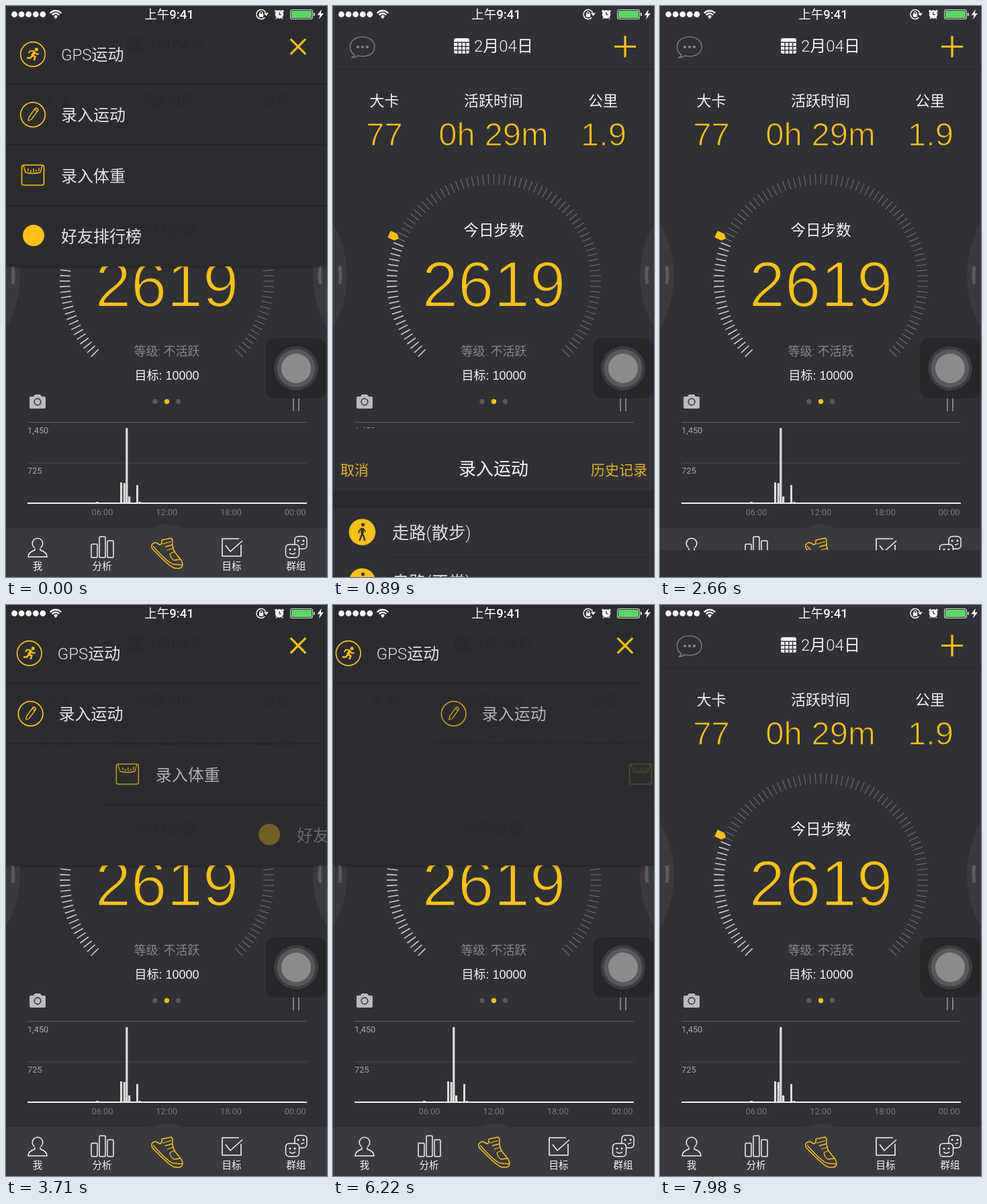
Write an HTML page with a canvas that moves like this. It is 478 px wide and 851 px high and loops after 8000 ms.

```html
<!DOCTYPE html>
<html lang="zh-CN">
<head>
<meta charset="utf-8">
<style>
html, body { margin: 0; width: 100%; height: 100%; overflow: hidden; background: #303136; }
canvas { display: block; width: 478px; height: 851px; }
</style>
</head>
<body>
<canvas id="stage"></canvas>
<script>
const W = 478, H = 851, LOOP = 8000;
const YELLOW = '#fec10d', BG = '#303136', DARK = '#2b2c2f', BAR = '#393a3f', WHITE = '#f4f4f4';
const CJK = '"Noto Sans CJK SC", "Noto Sans CJK", sans-serif';
const FONT = 'Roboto, ' + CJK, GROTESK = '"Liberation Sans", ' + CJK;
const canvas = document.getElementById('stage');
const ctx = canvas.getContext('2d');
const dpr = window.devicePixelRatio || 1;
canvas.width = W * dpr;
canvas.height = H * dpr;

const clamp = v => Math.min(1, Math.max(0, v));
const ramp = (t, start, length) => clamp((t - start) / length);
const smooth = v => v * v * (3 - 2 * v);

// y is the visual middle of the text line
function text(s, x, y, size, color = WHITE, align = 'center', weight = 300, family = FONT) {
  ctx.font = `${weight} ${size}px ${family}`;
  ctx.textAlign = align;
  ctx.fillStyle = color;
  ctx.fillText(s, x, y + size * 0.36);
}
// Large light numerals: a regular face thinned by an outline in the ground colour
function figure(s, x, y, size, color, ground) {
  text(s, x, y, size, color, 'center', 400, GROTESK);
  ctx.strokeStyle = ground;
  ctx.lineWidth = size * 0.023;
  ctx.strokeText(s, x, y + size * 0.36);
}
function rect(x, y, w, h, color) {
  ctx.fillStyle = color;
  ctx.fillRect(x, y, w, h);
}
function box(x, y, w, h, r, color, stroke) {
  ctx.beginPath();
  ctx.roundRect(x, y, w, h, r);
  paint(color, stroke);
}
function disc(x, y, r, color, stroke) {
  ctx.beginPath();
  ctx.arc(x, y, r, 0, Math.PI * 2);
  paint(color, stroke);
}
function paint(color, stroke) {
  if (stroke) {
    ctx.strokeStyle = color;
    ctx.lineWidth = stroke;
    ctx.stroke();
  } else {
    ctx.fillStyle = color;
    ctx.fill();
  }
}
function line(d, color, width) {
  ctx.strokeStyle = color;
  ctx.lineWidth = width;
  ctx.stroke(new Path2D(d));
}
function shape(d, color) {
  ctx.fillStyle = color;
  ctx.fill(new Path2D(d));
}
function at(x, y, draw, angle = 0, scale = 1) {
  ctx.save();
  ctx.translate(x, y);
  ctx.rotate(angle);
  ctx.scale(scale, scale);
  draw();
  ctx.restore();
}

const athletes = {
  walk(c) {
    disc(1, -11, 2.6, c);
    line('M0-6L0 2', c, 4.3);
    line('M0 2L-4 13M0 2L2 6L4 13', c, 2.4);
    line('M-1-6L-5-1L-5 2M1-6L5 0', c, 1.7);
  },
  jog(c) {
    disc(4, -10, 2.8, c);
    line('M2-5L0 2', c, 4.5);
    line('M0 2L4 5L3 11M0 2L-3 7L-8 9', c, 2.7);
    line('M2-6L-4-4L-6 0M2-5L5-1L8-2', c, 2.1);
  },
  run(c) {
    disc(6, -8, 2.8, c);
    line('M3-4L-1 2', c, 4.5);
    line('M-1 2L4 4L2 10M-1 2L-4 6L-10 6', c, 2.8);
    line('M3-5L-4-6L-7-2M3-4L6 0L10-1', c, 2.1);
  },
  bike(c) {
    disc(-7, 5, 4.2, c, 1.2);
    disc(7, 5, 4.2, c, 1.2);
    disc(5, -9, 2.3, c);
    line('M3-6L-3-2L1 1L0 6', c, 2.6);
    line('M3-5L5-2L8-2', c, 1.7);
    line('M-7 5L-3 0M0 6L6 1L7 5', c, 1.1);
  },
  swim(c) {
    disc(8, -2, 2.7, c);
    shape('M-10 2L-2-1L-5-4L2-8L8-6L2-5L5 2L-2 3Z', c);
    line('M-14 4Q-10 1-6 4T2 4T10 4L14 3', c, 1.8);
  }
};

function statusBar() {
  for (let i = 0; i < 5; i++) disc(12.5 + i * 10.6, 12.5, 4.4, '#fff');
  for (const r of [4, 8, 12]) {
    ctx.beginPath();
    ctx.arc(74, 18, r - 1, -Math.PI * 0.77, -Math.PI * 0.23);
    paint('#fff', 2.3);
  }
  disc(74, 17, 1.8, '#fff');
  text('上午9:41', 243, 12.5, 18.5, '#fff', 'center', 500);
  ctx.beginPath();
  ctx.arc(380, 12.5, 7, 0.7, 5.9);
  paint('#fff', 1.4);
  shape('M384 10.5L391 10.5L387.5 15Z', '#fff');
  box(376.8, 11.5, 6.4, 5, 0.8, '#fff');
  line('M378 12V10.5A2 2 0 0 1 382 10.5V12', '#fff', 1.2);
  disc(407, 12.5, 6.2, '#fff');
  line('M400.5 8.5L403 6.2M413.5 8.5L411 6.2M403 18L402 19M411 18L412 19', '#fff', 2);
  line('M407 9V12.8H410', BG, 1.3);
  box(423.5, 5.5, 33, 14, 3, '#d8d8d8', 1.1);
  box(425, 7, 30, 11, 1.5, '#58d963');
  box(457.8, 10, 2, 5, 1, '#d8d8d8');
  shape('M470 5L463.5 13.5H467.5L466 20L473 11H468.7Z', '#fff');
}

function calendar(color, hole) {
  box(180, 48, 23, 23, 3, color);
  rect(180, 53.5, 23, 1.5, hole);
  for (let i = 1; i < 4; i++) rect(179.5 + i * 5.8, 54, 1.4, 17, hole);
  for (let i = 1; i < 3; i++) rect(180, 54 + i * 5.6, 23, 1.4, hole);
}

function headings(label, value, ground) {
  calendar(label, ground);
  text('2月04日', 210, 59.5, 24, label, 'left');
  text('大卡', 76.5, 141, 22, label);
  text('活跃时间', 239, 141, 22, label);
  text('公里', 402, 141, 22, label);
  figure('77', 76.5, 190, 49, value, ground);
  figure('0h 29m', 239, 190, 49, value, ground);
  figure('1.9', 403, 190, 49, value, ground);
  text('今日步数', 239.5, 334, 22.5, label);
}

function gauge() {
  const cx = 239.5, cy = 410;
  for (let i = 0; i <= 90; i++) {
    const a = (135 + i * 3) * Math.PI / 180, c = Math.cos(a), s = Math.sin(a);
    const on = i < 23;
    ctx.beginPath();
    ctx.moveTo(cx + c * 144, cy + s * 144);
    ctx.lineTo(cx + c * 159.5, cy + s * 159.5);
    paint(on ? '#d2d2d2' : '#67686b', on ? 1.6 : 1.3);
  }
  at(cx, cy, () => shape('M-171-4.5Q-171-5.5-170-5.5H-160L-155 0L-160 5.5H-170Q-171 5.5-171 4.5Z', YELLOW),
    24.2 * Math.PI / 180);
}

function sideHandles() {
  disc(-134, 402, 155, '#3a3b3f');
  disc(612, 402, 155, '#3a3b3f');
  line('M10 388Q12 401 10 414', '#5b5c60', 5);
  line('M468 388Q466 401 468 414', '#5b5c60', 5);
}

function chart() {
  rect(32, 620, 416, 1, '#5b5c5f');
  rect(32, 680.5, 416, 1, '#4c4d50');
  const bars = [[134, 2, 4], [170, 31, 3], [174.7, 30, 3], [178.2, 112, 3.2], [182, 10, 3.2], [194, 27, 3], [198, 2, 3]];
  for (const [x, h, w] of bars) rect(x, 741 - h, w, h, '#dedede');
  rect(32, 740, 416, 2, '#ececec');
  text('1,450', 32, 632, 12.8, '#a5a5a7', 'left', 400);
  text('725', 32, 692, 12.8, '#a5a5a7', 'left', 400);
  ['06:00', '12:00', '18:00', '00:00'].forEach((s, i) => text(s, 143.5 + i * 95.7, 754, 12.8, '#7a7b7e', 'center', 400));
}

function tabBar() {
  disc(240, 817, 45, BAR);
  rect(0, 778, W, 73, BAR);
  disc(240, 817, 44.5, 'rgba(0,0,0,.06)', 1);
  disc(47, 801, 7.8, WHITE, 1.5);
  rect(42, 807, 10, 4, BAR);
  line('M43 808V811Q33 814 33 821H61Q61 814 51 811V808', WHITE, 1.5);
  box(127, 802, 9, 20, 1.5, WHITE, 1.5);
  box(139, 791, 9, 31, 1.5, WHITE, 1.5);
  box(151, 797, 9, 25, 1.5, WHITE, 1.5);
  line('M350 803V820H322V794H347M327 804L334 813L352 797', WHITE, 1.6);
  box(430, 790.5, 18, 18.5, 5, WHITE, 1.5);
  box(416.5, 802.5, 20, 19.5, 5, BAR);
  box(416.5, 802.5, 20, 19.5, 5, WHITE, 1.5);
  for (const [x, y] of [[435, 797], [443, 797], [423, 810], [430, 810]]) disc(x, y, 1.5, WHITE);
  line('M422 815Q426.5 819 431 815M439 803Q443 803 444 801', WHITE, 1.3);
  line('M217 803Q220 799 224 800L229 803Q233 802 232 796L246 793L248 796Q247 808 252 815L261 826Q264 832 262 836Q258 840 249 837Q241 833 218 809Q216 806 217 803Z', YELLOW, 1.5);
  line('M219 805Q240 829 249 832L262 833M233 802L246 798M237 806L248 803M240 811L250 808M244 816L252 813M244 816Q245 823 250 826L259 825', YELLOW, 1.3);
  [['我', 47], ['分析', 143], ['目标', 336], ['群组', 432]].forEach(([s, x]) => text(s, x, 835, 14.5, WHITE, 'center', 400));
}

function home() {
  rect(0, 0, W, H, BG);
  rect(0, 94, W, 1, '#26272a');
  line('M32 73Q25 68 25.5 60C26 51 34 46 44 46S62 52 62 61S54 75 44 75Q40 75 37 74Q33 77 28 77Q31 75 32 73Z', '#77787b', 1.6);
  for (const x of [37, 44, 51]) disc(x, 61, 2.1, '#8b8c8f');
  headings(WHITE, YELLOW, BG);
  sideHandles();
  gauge();
  figure('2619', 239.5, 413, 96, YELLOW, BG);
  text('等级: 不活跃', 239.5, 515, 18, '#85868a');
  text('目标: 10000', 239.5, 551, 18, WHITE, 'center', 400, GROTESK);
  for (const x of [222, 239.5, 256.5]) disc(x, 589.5, 3.7, x === 239.5 ? YELLOW : '#5b5c61');
  shape('M37 582H41L43 579H51L53 582H57Q59 582 59 584V598Q59 600 57 600H37Q35 600 35 598V584Q35 582 37 582Z', '#bcbcbd');
  disc(47, 590, 4.8, '#3a3b3f', 1.7);
  rect(427, 577, 2, 27, '#828286');
  rect(435, 577, 2, 27, '#828286');
  chart();
  tabBar();
}

const menuItems = [
  ['GPS运动', () => { disc(40, 72, 18.3, YELLOW, 1.7); at(40, 72, () => athletes.run(YELLOW), 0, 0.9); }],
  ['录入运动', () => {
    disc(40, 162, 18.3, YELLOW, 1.7);
    line('M33 171L34 166L44 152Q47 152 48 155L38 169ZM43 154L46 157', YELLOW, 1.3);
  }],
  ['录入体重', () => {
    box(23.5, 237, 33, 30, 3, YELLOW, 1.6);
    line('M26 238L29 248Q40 251 51 248L54 238M33 242V246M37 244V248M41 242V248M45 244V247M49 241V246', YELLOW, 1.3);
  }],
  ['好友排行榜', () => disc(41, 342, 16, YELLOW)]
];

const menuRuns = [
  { open: -999, close: 530, starts: [-9e3, -9e3, -9e3, -9e3] },
  { open: 3200, close: 4400, starts: [3327, 3502, 3591, 3652] },
  { open: 5870, close: 6900, starts: [5982, 6110, 6191, 6259] }
];

// Underdamped spring: 1 at rest off stage, settling on 0
function spring(ms) {
  const a = Math.max(0, ms) * 0.012;
  return Math.exp(-1.037 * a) * (Math.cos(a) + 1.037 * Math.sin(a));
}

function menu(t) {
  const run = menuRuns.find(r => t >= r.open && t < r.close + 300);
  const shown = run ? smooth(ramp(t, run.open, 240)) * (1 - smooth(ramp(t, run.close, 270))) : 0;
  if (shown > 0) {
    ctx.save();
    ctx.globalAlpha = shown;
    ctx.shadowColor = 'rgba(0,0,0,.5)';
    ctx.shadowBlur = 5 * dpr;
    rect(0, 0, W, 388, DARK);
    ctx.shadowColor = 'transparent';
    headings('#27282b', '#2a2b2e', DARK);
    menuItems.forEach(([label, icon], i) => {
      const x = W * spring(t - run.starts[i]);
      ctx.globalAlpha = shown * clamp(1 - x / W * 0.9);
      at(x, 0, () => {
        icon();
        text(label, 82, 72.5 + i * 90.3, 24, '#e4e4e4', 'left');
        if (i < 3) rect(0, 116 + i * 90.5, W, 1.2, '#1f2022');
      });
    });
    ctx.restore();
  }
  at(435, 60.5, () => line('M-16 0H16M0-16V16', YELLOW, 3.2), shown * Math.PI / 4);
}

const sports = [
  ['走路(散步)', 'walk', '#f9c112'], ['走路(正常)', 'walk', '#f9c112'], ['走路(快走)', 'walk', '#f9c112'],
  ['慢跑(低强度)', 'jog', '#8ace27'], ['跑步(低强度)', 'run', '#8ace27'], ['跑步(高强度)', 'run', '#8ace27'],
  ['自行车(低强度)', 'bike', '#38dcd7'], ['自行车(高强度)', 'bike', '#38dcd7'],
  ['游泳(低强度)', 'swim', '#2da3ec'], ['游泳(高强度)', 'swim', '#2da3ec']
];

function sportSheet(t) {
  rect(0, 0, W, H, BG);
  rect(0, 93, W, 28, '#292a2d');
  rect(0, 120.5, W, 1, '#38393d');
  text('取消', 11, 62, 21, '#e6b21d', 'left');
  text('录入运动', 239, 61, 26);
  text('历史记录', 468, 62, 21, '#e6b21d', 'right');
  sports.forEach(([label, athlete, color], i) => {
    const y = 155 + i * 73.8;
    disc(43.5, y, 19.8, color);
    at(43.5, y, () => athletes[athlete](BG));
    text(label, 88, y + 1, 25.3, '#dedede', 'left');
    rect(88, y + 37, W - 88, 1, '#27282b');
  });
  ctx.globalAlpha = ramp(t, 1400, 150) * (1 - ramp(t, 2000, 250));
  box(472, 97, 4.5, 504, 2.2, '#1f2023');
  ctx.globalAlpha = 1;
}

// Critically damped glide from 1 to 0
function glide(ms) {
  const a = Math.max(0, ms) * 0.011;
  return (1 + a) * Math.exp(-a);
}

function sheetTop(t) {
  if (t < 799 || t > 2810) return H;
  const top = t < 2230 ? glide(t - 799) : 1 - glide(t - 2230);
  return Math.round(H * top);
}

function touchButton() {
  box(387, 495, 90, 90, 14, 'rgba(37,38,41,.9)');
  disc(432, 540, 33, '#3c3d40');
  disc(432, 540, 28.5, '#58595b');
  disc(432, 540, 22, '#8b8b8d');
}

const stepped = t => Math.floor((t + 7) / 147.9) * 148.2;

function frame(now) {
  const t = stepped(now % LOOP);
  ctx.setTransform(dpr, 0, 0, dpr, 0, 0);
  ctx.lineJoin = 'round';
  home();
  menu(t);
  const top = sheetTop(t);
  if (top < H) at(0, top, () => sportSheet(t));
  statusBar();
  touchButton();
  requestAnimationFrame(frame);
}
requestAnimationFrame(frame);
</script>
</body>
</html>
```
